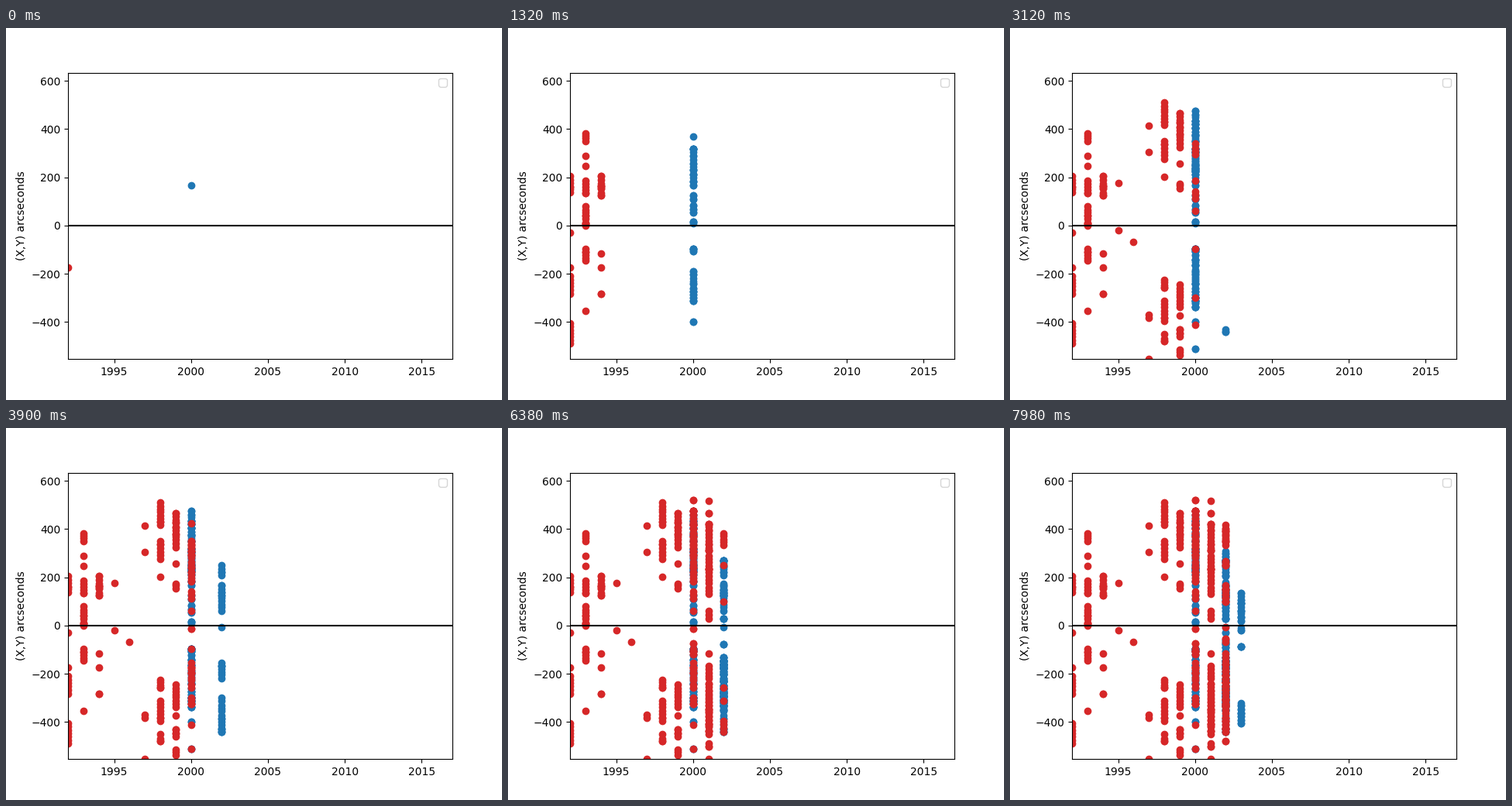
Animation, 640 px wide and 480 px high, one loop 8 s. Source, as a matplotlib script:

```python
import math
import random

import matplotlib.pyplot as plt
import numpy as np
from matplotlib.animation import FuncAnimation

FRAMES = 400
INTERVAL = 20
GAP = 15      # usual distance between neighbouring dots
JITTER = 3

rng = random.Random(4)


def band(start, stop=None):
    """Dots about GAP apart from start to stop, or one lone dot."""
    if stop is None:
        return [start]
    n = math.ceil(abs(stop - start) / GAP) + 1
    inner = np.linspace(start, stop, n)[1:-1]
    return [start, *(y + rng.uniform(-JITTER, JITTER) for y in inner), stop]


def season(year, count, *bands):
    """`count` sightings in random order: each dot of the bands once, then repeats."""
    ys = [y for b in bands for y in band(*b)]
    ys += rng.choices(ys, k=max(0, count - len(ys)))
    rng.shuffle(ys)
    return [(year, y) for y in ys]


# One sighting of each colour appears per frame.
reds = np.array(
    season(1992, 1, (-172,))
    + season(1992, 21, (138, 204), (-30,), (-208, -283), (-404, -487))
    + season(1993, 29, (0, 80), (134, 185), (247,), (288,), (350, 383),
             (-98, -145), (-355,))
    + season(1994, 16, (125, 204), (-117,), (-172,), (-282,))
    + season(1995, 2, (176,), (-20,))
    + season(1996, 1, (-68,))
    + season(1997, 5, (305,), (415,), (-370, -384), (-552,))
    + season(1998, 34, (203,), (277, 350), (418, 510), (-225, -258),
             (-312, -395), (-450, -480))
    + season(1999, 36, (153, 173), (257,), (325, 465), (-245, -338), (-374,),
             (-430, -460), (-515, -535))
    + season(2000, 12, (60,), (112, 140), (185,), (295, 340), (-98,), (-300,), (-412,))
    + season(2000, 39, (182, 350), (425,), (-12,), (-155, -258), (-310, -325), (-512,))
    + season(2000, 33, (355, 475), (520,), (-75,), (-105, -120))
    + season(2001, 26, (30, 60), (130, 235), (-117,), (-168, -220), (-290, -408))
    + season(2001, 52, (235, 422), (465,), (517,), (-240, -450), (-490, -500), (-552,))
    + season(2002, 13, (335, 383), (252,), (98,), (-258,), (-312,), (-395, -440))
    + season(2002, 80, (350, 417), (250, 267), (100, 167), (-5,), (-55, -68),
             (-117, -440), (-480,))
)

blues = np.array(
    season(2000, 1, (166,))
    + season(2000, 66, (10, 15), (55, 82), (110, 125), (168, 318), (370,),
             (-98, -105), (-190, -312), (-397,))
    + season(2000, 87, (335, 475), (225, 305), (-95, -240), (-300, -338), (-512,))
    + season(2002, 3, (-432, -440))
    + season(2002, 39, (60, 167), (210, 250), (-5,), (-155, -217), (-300, -440))
    + season(2002, 59, (-78,), (-133, -350))
    + season(2002, 65, (28,), (125, 172), (245, 270), (-145, -330))
    + season(2002, 40, (45, 180), (205,), (262, 308), (-30,), (-60, -120))
    + season(2003, 40, (20, 135), (-10, -20), (-88,), (-320, -405))
)

fig, ax = plt.subplots(figsize=(6.4, 4.8), dpi=100)
ax.set_xlim(1992, 2017)
ax.set_ylim(-553.3, 634)
ax.set_ylabel("(X,Y) arcseconds")
ax.axhline(0, color="black")
ax.legend(handles=[], loc="upper right")

blue_dots = ax.scatter([], [], color="tab:blue")
red_dots = ax.scatter([], [], color="tab:red")


def update(i):
    blue_dots.set_offsets(blues[:i + 1])
    red_dots.set_offsets(reds[:i + 1])
    return blue_dots, red_dots


anim = FuncAnimation(fig, update, frames=FRAMES, interval=INTERVAL,
                     repeat=True, repeat_delay=0)
plt.show()
```
